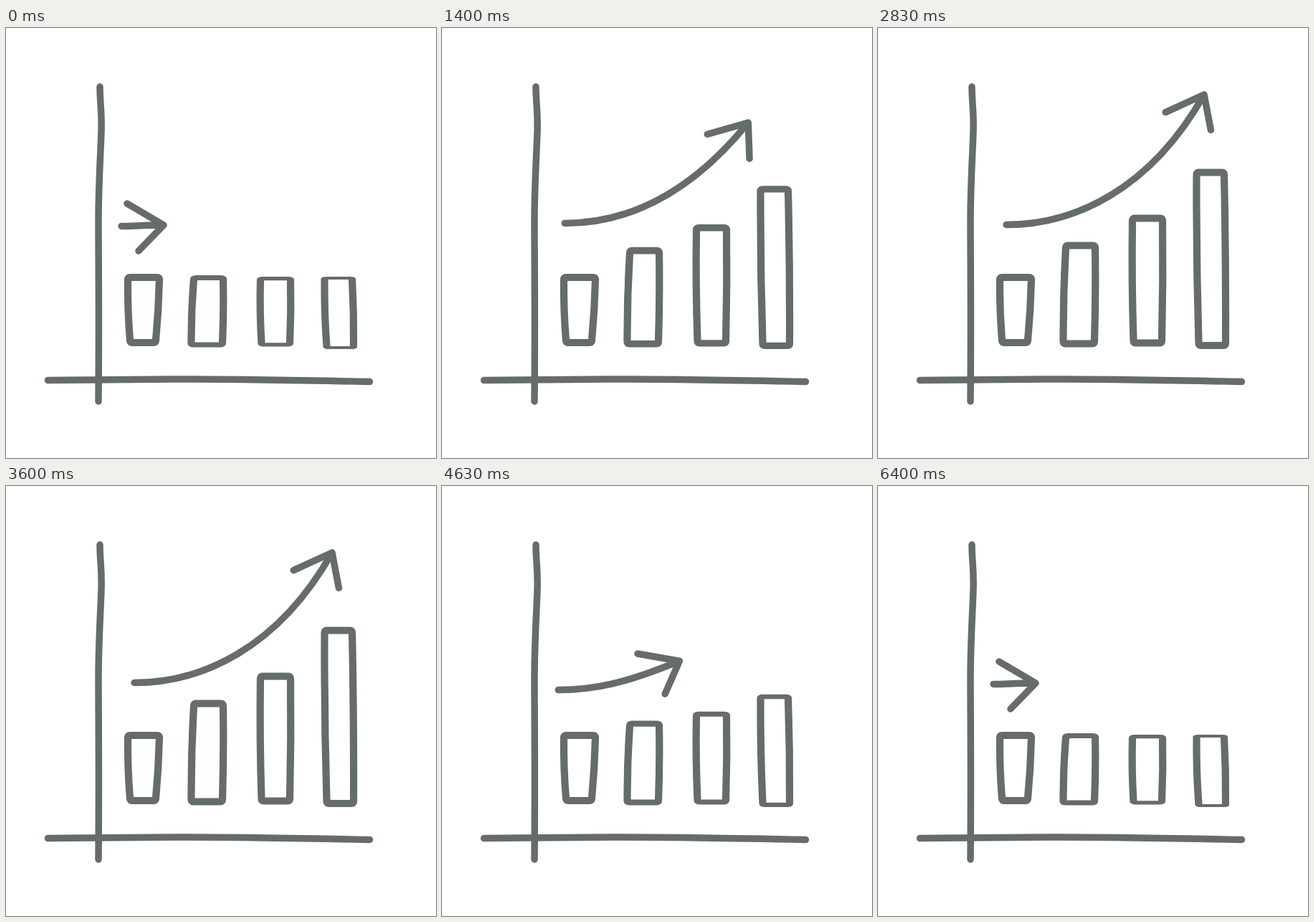
These frames come from a looping animation (600 px wide and 600 px high, 6560 ms). An HTML page:

```html
<!DOCTYPE html>
<html lang="en">
<head>
<meta charset="utf-8">
<title>Growing bar chart</title>
<style>
  html, body { margin: 0; width: 100%; height: 100%; overflow: hidden; background: #fff; }
  svg { display: block; width: 100%; height: 100%; }
  path { fill: none; stroke: #666b6c; stroke-width: 9.5; stroke-linecap: round; stroke-linejoin: round; }
  .bar { stroke-width: 10.2; }
</style>
</head>
<body>
<svg id="chart" viewBox="0 0 600 600">
  <path d="M131 82C131 105 134 115 133 145S129 220 129 270S130 400 129 521"/>
  <path d="M58.500 491.500Q150 490.500 235 490T507.500 493.500"/>
  <path id="arrow"/>
</svg>
<script>
const LOOP = 6560, MOVE = 1230, RISE = 480, FALL = 3930;
const TURN = -55 * Math.PI / 180;

// Outlines at full height; rest is the outer top edge when low
const bars = [
  { left: 170, right: 214, top: 348, foot: 439, rest: 343, leanLeft: 3, leanRight: -5 },
  { left: 262, right: 303, top: 303.5, foot: 440.5, rest: 345, leanLeft: -3.5, leanRight: -1 },
  { left: 355, right: 397, top: 265.5, foot: 439.5, rest: 347, leanLeft: 1.5, leanRight: -1 },
  { left: 444.5, right: 483, top: 201.5, foot: 443, rest: 347, leanLeft: 3, leanRight: 2 }
];

// Curves that the two ends of the arrow shaft travel along
const tailTrack = [[161, 276.5], [163, 303], [159, 263], [179, 274.5]];
const tipTrack = [[220, 275], [340, 289], [397, 170], [455, 93]];
const wings = [[-51, -30], [-35, 36]];

const chart = document.getElementById('chart');
const arrow = document.getElementById('arrow');

const pt = ([x, y]) => x.toFixed(2) + ' ' + y.toFixed(2);

function ease(x) {
  const s = Math.min(1, Math.max(0, x));
  return s * s * (3 - 2 * s);
}

function along([a, b, c, d], p) {
  const q = 1 - p;
  return [0, 1].map(i =>
    q * q * q * a[i] + 3 * q * q * p * b[i] + 3 * q * p * p * c[i] + p * p * p * d[i]);
}

function rotate([x, y], angle) {
  const c = Math.cos(angle), s = Math.sin(angle);
  return [x * c - y * s, x * s + y * c];
}

// Hand-drawn box: soft corners, leaning and slightly bowed sides
function outline({ left, right, top, foot, leanLeft, leanRight }) {
  const r = 3, mid = (top + foot) / 2;
  const l = left + leanLeft, e = right + leanRight;
  return `M${left + r} ${top}H${right - r}Q${right} ${top} ${right} ${top + r}` +
    `Q${(right + e) / 2 + 1.5} ${mid} ${e} ${foot - r}Q${e} ${foot} ${e - r} ${foot}` +
    `H${l + r}Q${l} ${foot} ${l} ${foot - r}` +
    `Q${(left + l) / 2 - 2} ${mid} ${left} ${top + r}Q${left} ${top} ${left + r} ${top}Z`;
}

for (const bar of bars) {
  bar.path = document.createElementNS(chart.namespaceURI, 'path');
  bar.path.setAttribute('class', 'bar');
  bar.path.setAttribute('d', outline(bar));
  chart.append(bar.path);
}

function drawBar(bar, p) {
  const base = bar.foot + 5;
  const low = (base - bar.rest) / (base - bar.top + 5);
  const k = low + (1 - low) * p;
  bar.path.setAttribute('transform', `translate(0 ${base * (1 - k)}) scale(1 ${k})`);
}

function drawArrow(p) {
  const tail = along(tailTrack, p), tip = along(tipTrack, p);
  const from = ([x, y], [dx, dy]) => [x + dx, y + dy];
  const length = Math.hypot(tip[0] - tail[0], tip[1] - tail[1]);
  const out = from(tail, [0.28 * length, 0]);
  const back = from(tip, rotate([-0.47 * length, 0], 1.1 * TURN * p));
  const [upper, lower] = wings.map(w => from(tip, rotate(w, TURN * p)));
  arrow.setAttribute('d',
    `M${pt(tail)}C${pt(out)} ${pt(back)} ${pt(tip)}M${pt(upper)}L${pt(tip)}L${pt(lower)}`);
}

function draw(now) {
  const t = now % LOOP, part = t % 100;
  const time = t - part + (part < 30 ? 0 : 50);
  const p = ease((time - RISE) / MOVE) - ease((time - FALL) / MOVE);
  bars.forEach(bar => drawBar(bar, p));
  drawArrow(p);
}

const begin = performance.now();
function tick() {
  draw(performance.now() - begin);
  requestAnimationFrame(tick);
}
tick();
</script>
</body>
</html>
```
